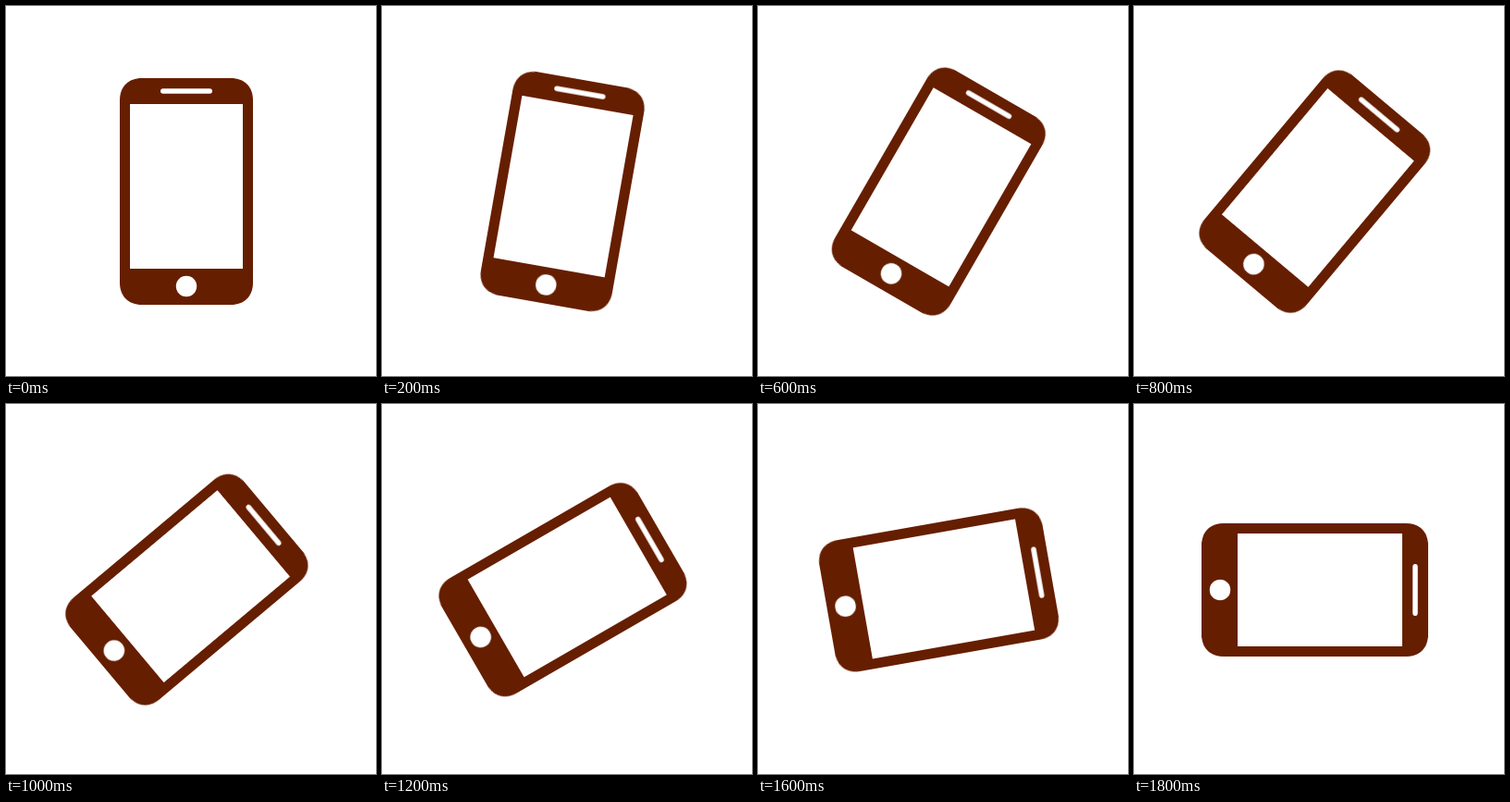
Animation of 400 by 400 pixels, one loop 1900 ms. Source, as an HTML page:

```html
<!DOCTYPE html>
<html lang="en">
<head>
<meta charset="utf-8">
<title>Rotating phone</title>
<style>
  html, body { margin: 0; width: 100%; height: 100%; overflow: hidden; background: #fff; }
  svg { display: block; width: 100vw; height: 100vh; }
  #phone {
    transform-origin: 195px 201px;
    /* 5 degrees every 100 ms, then a hard cut back to upright */
    animation: turn 1900ms steps(19, end) infinite;
  }
  @keyframes turn {
    from { transform: rotate(0deg); }
    to { transform: rotate(95deg); }
  }
</style>
</head>
<body>
<svg viewBox="0 0 400 400">
  <g id="phone" fill="#fff">
    <path fill="#661e00" d="M147 78H243c14.8 0 24 9.2 24 24V299c0 14.8-9.2 24-24 24H147c-14.8 0-24-9.2-24-24V102c0-14.8 9.2-24 24-24z"/>
    <rect x="134" y="106" width="122" height="178"/>
    <rect x="167" y="89.2" width="56" height="5.6" rx="2.8"/>
    <circle cx="195" cy="303" r="11.2"/>
  </g>
</svg>
</body>
</html>
```
